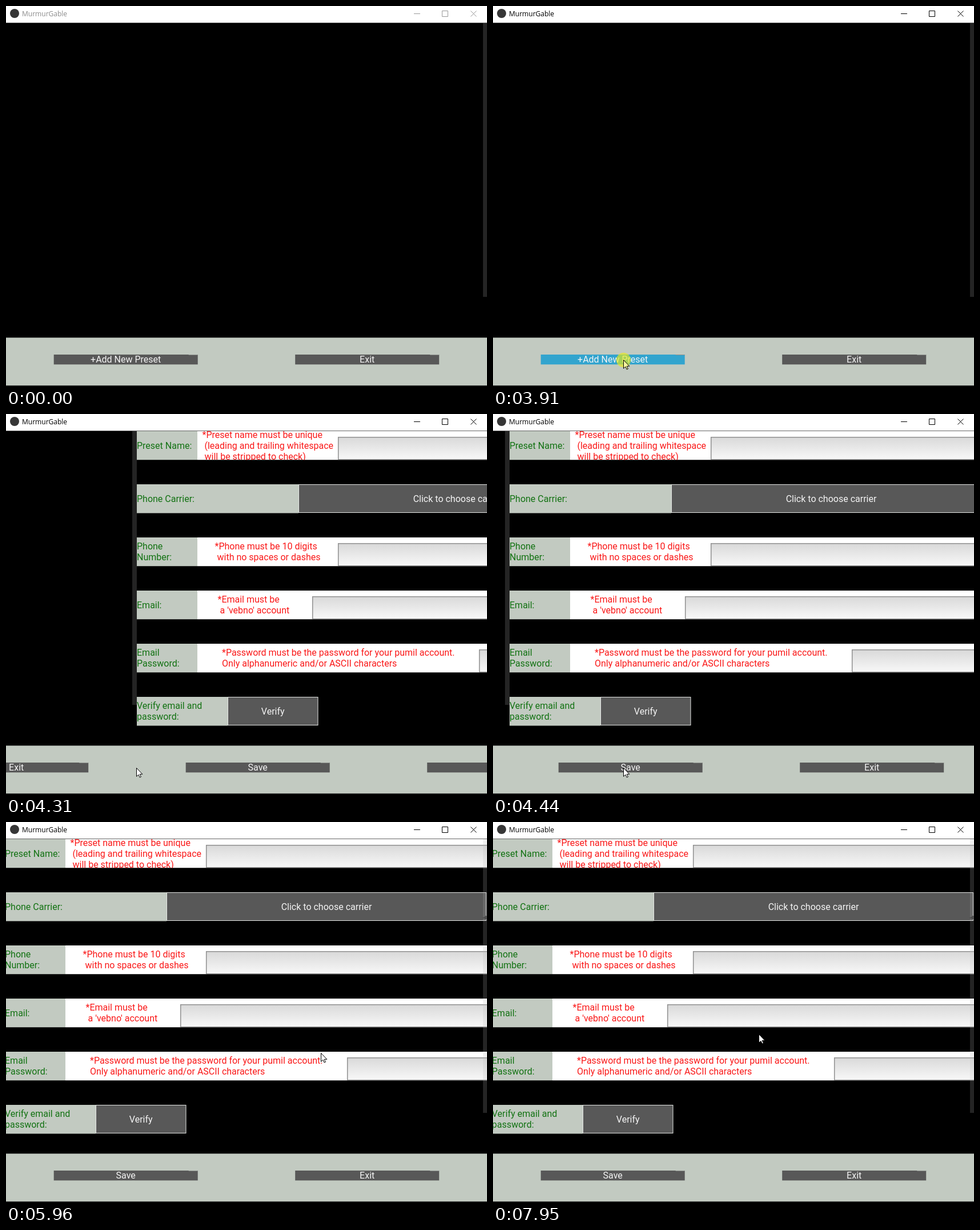
Recreate the animation shown at these times as an HTML page. Size 842 px wide and 665 px high, loop 8 s.

```html
<!DOCTYPE html>
<html lang="en">
<head>
<meta charset="utf-8">
<title>MurmurGable</title>
<style>
  html, body { margin: 0; width: 100%; height: 100%; overflow: hidden; background: #000; }
  svg { display: block; width: 842px; height: 665px; }
  text { font: 16px Roboto, Arial, sans-serif; }
  .mid { text-anchor: middle; fill: #f4f4f4; }
  .label { fill: #127212; }
  .hint { fill: #fa1818; }
  .name { font: 12px "Open Sans", "Noto Sans", sans-serif; }
</style>
</head>
<body>
<svg viewBox="0 0 842 665">
  <defs>
    <linearGradient id="field" x2="0" y2="1">
      <stop offset="0" stop-color="#d9d9d9"/>
      <stop offset="1" stop-color="#f8f8f8"/>
    </linearGradient>
  </defs>
  <rect width="842" height="665"/>
  <rect y="580" width="842" height="85" fill="#c2cac1"/>
  <rect y="580" width="842" height="1" fill="#7c817c"/>
  <g id="home"></g>
  <g id="form"></g>
  <rect y="664" width="842" height="1" fill="#1c1c1c"/>
  <rect width="842" height="29" fill="#fff"/>
  <rect y="29" width="842" height="1" fill="#666"/>
  <circle cx="15" cy="13" r="8" fill="#363636"/>
  <text id="name" class="name" x="28" y="17.5">MurmurGable</text>
  <path id="controls" d="M714 13.5h11M763.5 8.5h10v10h-10zM813.5 8.5l10 10m0-10l-10 10" fill="none"/>
  <circle id="click" cx="228.5" cy="619.5" r="12.7" fill="#ebeb14" fill-opacity=".64"/>
  <path id="cursor" d="M.5 .5V15.3L3.9 12.2L6.2 17L8.4 16L6.2 11.3H10.8Z" fill="#fff" stroke="#000"/>
</svg>
<script>
const LOOP = 8000, LEFT = -2, WIDTH = 845, TOP = 30, ROW = 50.5, PITCH = 93;
const $ = id => document.getElementById(id);

// Markup helpers
const rect = (x, y, w, h, fill, more = '') =>
  `<rect x="${x}" y="${y}" width="${w}" height="${h}" fill="${fill}" ${more}/>`;
const text = (x, y, s, cls) => `<text x="${x}" y="${y}" class="${cls}">${s}</text>`;
const lines = (x, mid, rows, cls, indent = 0) => rows.map((s, i) =>
  text(x + (i && indent), mid + 5.5 + 19 * (i - (rows.length - 1) / 2), s, cls)).join('');
const rowY = i => TOP + PITCH * i;

const footButton = (x, s, id = '') =>
  rect(x, 610, 252, 17.3, '#585858', id && `id="${id}"`) +
  rect(x + 236, 610, 16, 1, '#8d918d') + text(x + 126, 624, s, 'mid');
const footer = (s, id) => footButton(83.7, s, id) + footButton(506.2, 'Exit');
const bar = id => rect(835, TOP, 8, 479, '#b3b3b3', `id="${id}" fill-opacity=".2"`);
const backdrop = rect(LEFT, TOP, WIDTH, 550, '#000');

const label = (i, w, rows) =>
  rect(LEFT, rowY(i), w, ROW, '#c2cac1') + lines(LEFT, rowY(i) + 25, rows, 'label');
const choice = (i, x, w, name, s) => label(i, x - LEFT, name) +
  rect(x + .5, rowY(i) + .5, w - 1, 49, '#585858', 'stroke="#e4e6e4"') +
  text(x + w / 2, rowY(i) + 30.5, s, 'mid');
const entry = (i, name, hint, x, indent, field) =>
  rect(104, rowY(i), 739, ROW, '#fff') + label(i, 106, name) +
  lines(x, rowY(i) + 25, hint, 'hint', indent) +
  rect(field + .7, rowY(i) + 10.7, 860 - field, 39, 'url(#field)', 'stroke="#8f8f8f" stroke-width="1.5"') +
  rect(LEFT, rowY(i) + ROW, WIDTH, PITCH - ROW, '#000');

$('home').innerHTML = backdrop + bar('homeBar') + footer('+Add New Preset', 'add');

$('form').innerHTML = backdrop +
  entry(0, ['Preset Name:'], ['*Preset name must be unique',
    '(leading and trailing whitespace', 'will be stripped to check)'], 112.5, 4, 350) +
  choice(1, 281, 560, ['Phone Carrier:'], 'Click to choose carrier') +
  '<path d="M842 163V171L834 168Z" fill="#333"/>' +
  entry(2, ['Phone', 'Number:'], ['*Phone must be 10 digits', 'with no spaces or dashes'], 134.5, 4, 350) +
  entry(3, ['Email:'], ['*Email must be', "a 'vebno' account"], 139.5, 4, 305) +
  entry(4, ['Email', 'Password:'], ['*Password must be the password for your pumil account.',
    'Only alphanumeric and/or ASCII characters'], 147, 0, 597) +
  choice(5, 157, 158.5, ['Verify email and', 'password:'], 'Verify') +
  bar('formBar') + footer('Save');

// Motion helpers
const clamp = v => Math.min(1, Math.max(0, v));
const span = (t, from, to) => clamp((t - from) / (to - from));
const mix = (a, b, u) => a + (b - a) * u;
const bezier = (a, b, c, u) => a.map((v, k) => mix(mix(v, b[k], u), mix(b[k], c[k], u), u));

const BUTTON = [228, 619], LOOP_IN = [551, 404];
const REST = 4640, CIRCLE = 5964, END = 7950;

// Two drifting, quickening counter-clockwise turns
function circle(u) {
  const p = u ** 1.3, angle = mix(-.99, 4 * Math.PI - .785, p);
  return [
    mix(502, 373, p) + mix(90, 130, p) * Math.cos(angle),
    mix(245, 265, p) - mix(190, 150, p) * Math.sin(angle)
  ];
}

function pointer(t) {
  if (t < REST) return bezier([448, 216], [188, 560], BUTTON, span(t, 920, 2050));
  if (t < CIRCLE - 10) return bezier(BUTTON, [460, 620], LOOP_IN, span(t, REST, CIRCLE) ** 1.78);
  return circle(span(t, CIRCLE, END));
}

// The screen is refreshed about 15 times a second
const snap = (t, base, step) => base + step * Math.floor((t - base + 7) / step);

function draw(t) {
  const s = t < 4100 ? snap(t, 920, 66.6) : snap(t, 4110, 66.2);
  const active = t >= 2450;
  const pressed = t >= 3910 && t < 4110;
  const clicked = pressed || (active && t < 2720);
  const show = (id, on) => $(id).style.display = on ? '' : 'none';
  const shift = (id, x, y = 0) =>
    $(id).setAttribute('transform', `translate(${Math.round(x)} ${Math.round(y)})`);

  const left = (1 - span(s, 4117.7, 4517.7)) ** 2;
  shift('home', WIDTH * (left - 1));
  shift('form', WIDTH * left);
  show('form', left < 1);
  $('formBar').setAttribute('fill-opacity', mix(.2, .9, (1 - span(s, 4620, 5120)) ** 4));

  $('add').setAttribute('fill', pressed ? '#32a4ce' : '#585858');
  $('name').setAttribute('fill', active ? '#000' : '#8c8c8c');
  $('controls').setAttribute('stroke', active ? '#000' : '#999');
  show('click', clicked);

  shift('cursor', ...pointer(s));
  $('cursor').setAttribute('fill', clicked ? '#f8f8a0' : '#fff');
  show('cursor', t >= 920);
}

const start = performance.now();
function tick() {
  draw((performance.now() - start) % LOOP);
  requestAnimationFrame(tick);
}
tick();
</script>
</body>
</html>
```
